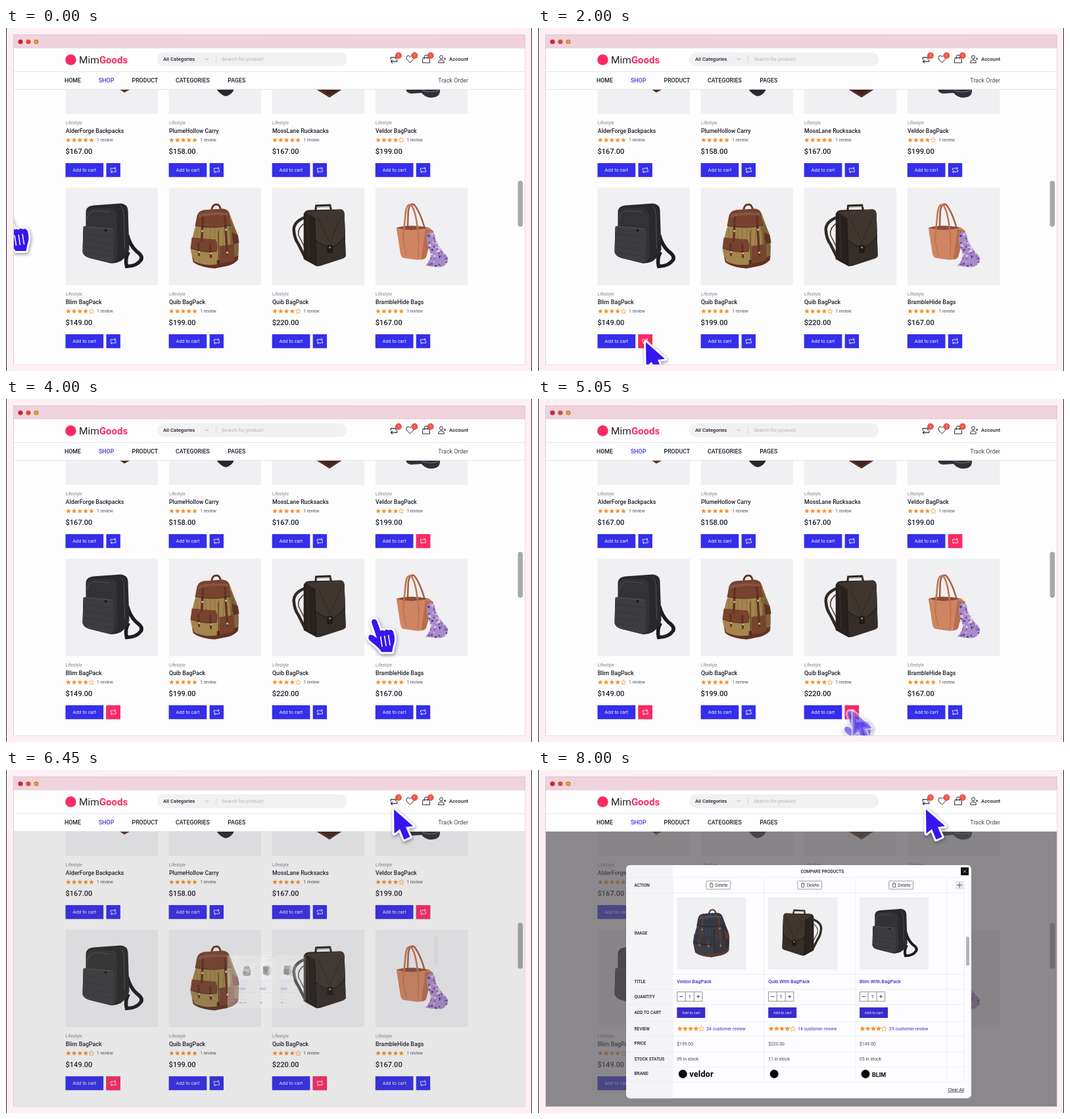
An HTML page with a canvas for the animation above (8.05 s loop, 800x523 px).

```html
<!DOCTYPE html>
<html lang="en">
<head>
<meta charset="utf-8">
<title>Product compare</title>
<style>
html, body { margin: 0; width: 100%; height: 100%; overflow: hidden; background: #fdf0f5; }
canvas { display: block; }
</style>
</head>
<body>
<canvas id="stage" width="800" height="523"></canvas>
<script>
const ctx = document.getElementById('stage').getContext('2d');
const LOOP = 8050;
const BLUE = '#352eea', RED = '#fb2a63', INK = '#1e1e2a', LINE = '#e6e6ec', STAR = '#f5922f';
const COLS = [90.5, 247.6, 404.7, 561.8];

// ---------- helpers ----------
const clamp = v => Math.max(0, Math.min(1, v));
const ramp = (t, start, len) => clamp((t - start) / len);
const ease = k => (1 - Math.cos(Math.PI * k)) / 2;

function rect(x, y, w, h, fill, r = 0) {
  ctx.fillStyle = fill;
  ctx.beginPath();
  ctx.roundRect(x, y, w, h, r);
  ctx.fill();
}
function box(x, y, w, h, color, r = 0) {
  ctx.strokeStyle = color;
  ctx.lineWidth = 0.8;
  ctx.beginPath();
  ctx.roundRect(x, y, w, h, r);
  ctx.stroke();
}
function dot(x, y, r, fill) {
  ctx.fillStyle = fill;
  ctx.beginPath();
  ctx.arc(x, y, r, 0, 7);
  ctx.fill();
}
function text(s, x, y, size, color = INK, weight = 400, align = 'left') {
  ctx.font = `${weight} ${size}px Roboto, sans-serif`;
  ctx.textAlign = align;
  ctx.fillStyle = color;
  ctx.fillText(s, x, y);
  return x + ctx.measureText(s).width;
}
function fill(d, color) {
  ctx.fillStyle = color;
  ctx.fill(new Path2D(d));
}
function line(d, color, width = 1) {
  ctx.strokeStyle = color;
  ctx.lineWidth = width;
  ctx.stroke(new Path2D(d));
}
function at(x, y, draw, sx = 1, sy = sx) {
  ctx.save();
  ctx.translate(x, y);
  ctx.scale(sx, sy);
  draw();
  ctx.restore();
}
function stars(x, y, n, gap = 8.8, r = 4.1) {
  for (let i = 0; i < 5; i++) {
    ctx.beginPath();
    for (let k = 0; k < 10; k++) {
      const a = k * Math.PI / 5 - Math.PI / 2, q = k % 2 ? r * 0.45 : r;
      ctx.lineTo(x + i * gap + q * Math.cos(a), y + q * Math.sin(a));
    }
    ctx.closePath();
    ctx.fillStyle = ctx.strokeStyle = STAR;
    ctx.lineWidth = 0.7;
    if (i < n) ctx.fill(); else ctx.stroke();
  }
}
const swapIcon = (x, y, color, s = 1) => at(x, y, () =>
  line('M-4 .5V-2.6H3.8M1.8-4.6L3.9-2.6L1.8-.6M4-.5V2.6H-3.8M-1.8 .6L-3.9 2.6L-1.8 4.6', color, 0.85), s);

// ---------- bags, each on a 140 x 148 tile ----------
function messenger() {
  line('M94 72Q98 88 108 97Q118 104 115 110Q108 120 93 120Q90 108 96 98', '#1d1d1f', 5.5);
  fill('M31 36Q32 28 42 27L84 24Q94 25 95 34L97 94Q95 104 84 112Q76 116 68 115L36 107Q27 104 26 98L27 62L31 58Z', '#29292b');
  fill('M32 37Q34 31 43 31L70 31Q78 33 78 42L79 104Q77 114 68 115L36 107Q30 104 31 96Z', '#333335');
  fill('M27 59L68 62Q74 63 74 69L73 110Q70 115 66 114L36 107Q27 104 26 98Z', '#3d3d3f');
  line('M33 48Q35 36 45 35L68 37M28 59L72 63M84 28Q89 34 89 44L90 92', '#56565a', 0.9);
  line('M28 70L72 75M28 80L72 86M28 90L72 96M28 99L71 105', '#343436', 0.8);
  dot(61, 65, 2, '#1a1a1b');
}
function backpack(body, flap, trim, metal) {
  line('M65 35Q66 25.5 72 25.5Q78 25 79 35', trim, 2.8);
  fill('M44 41Q46 35 54 34L82 32Q91 33 94 43Q99 58 104 70Q108 88 105 110Q100 116 90 119L70 123Q46 121 37 113L33 94Q36 72 41 58Z', body);
  for (let i = 0; i < 9; i++) line(`M${42 + i * 7} 62Q${45 + i * 6} 88 ${43 + i * 7} 114`, 'rgba(0,0,0,.13)', 1.2);
  fill('M95 48Q99 58 104 70Q108 88 105 110Q100 116 90 119Q96 84 91 60Z', 'rgba(30,18,8,.28)');
  fill('M36 106Q62 117 106 104L105 110Q100 116 90 119L70 123Q46 121 37 113Z', trim);
  fill('M43 42Q46 35 54 34L82 32Q91 33 92 40L95 57Q70 64 40 58Z', flap);
  fill('M46 41Q66 35 90 39L90 43Q68 39 45 46Z', 'rgba(255,255,255,.1)');
  fill('M35 88L73 91L73 117Q54 120 38 112Z', body);
  fill('M35 76L71 79Q76 86 73 97Q52 100 33 92Z', flap);
  fill('M77 89L99 86L100 110Q88 116 77 115Z', flap);
  fill('M96 68L105 72L107 84L98 86Z', trim);
  line('M52 44L50 82M85 42L88 88', trim, 3.4);
  line('M45 84L46 104M63 86L64 107M88 88L89 104', trim, 3);
  line('M40 58Q70 64 95 57M33 92Q52 100 73 97M75 66L76 116', 'rgba(20,8,5,.5)', 1.2);
  for (const [x, y] of [[51, 66], [87, 64], [46, 98], [64, 100], [89, 99]]) rect(x - 1.5, y - 1.5, 3, 3, metal, 1);
}
const tanPack = () => backpack('#a3854d', '#77432f', '#623224', '#d2b479');
const darkPack = () => backpack('#3c3e48', '#363843', '#5c3b30', '#b98a63');
function briefcase() {
  line('M50 45Q33 52 33 64Q34 78 40 86Q46 98 50 106', '#302925', 4.5);
  line('M50 54Q39 60 40 72L49 90', '#443b35', 1.5);
  line('M66 36L67 27.5L88 26.5L90 35', '#2a2420', 3);
  line('M67 30L89 29', '#8f8a83', 1.2);
  fill('M48 40Q50 34 57 34L104 33Q109 33 110 39L112 105L68 120L48 109Z', '#28221f');
  fill('M66 41L104 36Q109 36 110 41L112 104Q111 107 108 108L74 119Q68 121 67 116Z', '#352d28');
  fill('M50 37L104 33Q109 33 110 40L111 74Q100 88 89 92Q76 88 66 80L65 46Z', '#3f3630');
  line('M66 80Q76 88 89 92Q100 88 111 74M65 46L67 118', '#1a1614', 1);
  line('M70 46L88 84L106 42', '#2d2622', 1);
  rect(83.5, 87, 9, 13, '#221c19', 3);
  dot(88, 91, 1.6, '#8d8275');
  line('M54 42L56 108', '#3a312c', 1.2);
}
function tote() {
  line('M49 62L50 36Q52 22 59 26Q69 38 76 66', '#a95f43', 2.6);
  fill('M32 61Q52 68 82 61L88 66L77 106Q74 110 63 110L42 107Q39 105 38 100Z', '#cf8561');
  fill('M32 61Q52 55 82 61Q52 68 32 61Z', '#8b4c36');
  fill('M76 63L88 66L77 106Q74 110 70 109Z', '#b76e4e');
  line('M42 80L46 38Q48 23 55 27Q63 38 66 82', '#c27553', 2.6);
  line('M42 78L47 104M66 80L65 107', '#b66d4d', 1.1);
  ctx.save();
  ctx.clip(new Path2D('M80 68Q91 64 91 78Q97 92 104 99Q113 106 109 114Q104 122 95 121L76 119Q86 109 84 99Q75 82 80 68Z'));
  rect(70, 60, 50, 70, '#a98bc9');
  const tints = ['#6b4a9c', '#d9c4e8', '#8465bd', '#e8b9cf', '#54407f'];
  for (let i = 0; i < 120; i++) {
    const rnd = k => Math.abs(Math.sin(i * k) * 9301) % 1;
    dot(74 + 40 * rnd(12.9), 65 + 58 * rnd(78.2), 0.8 + 1.2 * rnd(4.7), tints[i % 5]);
  }
  ctx.restore();
}

// ---------- page ----------
const ITEMS = [
  ['AlderForge Backpacks', 167, 5], ['PlumeHollow Carry', 158, 5],
  ['MossLane Rucksacks', 167, 5], ['Veldor BagPack', 199, 4],
  ['Blim BagPack', 149, 4, messenger], ['Quib BagPack', 199, 5, tanPack],
  ['Quib BagPack', 220, 4, briefcase], ['BrambleHide Bags', 167, 5, tote]
];

function product([name, price, rate, bag], i, picked) {
  const x = COLS[i % 4], y = i < 4 ? 0 : 261;
  rect(x, y - 17.5, 140.5, 148.5, '#f0eff1');
  if (bag) at(x, y - 17.5, bag);
  text('Lifestyle', x + 0.3, y + 147, 6.7, '#85858c');
  text(name, x + 0.3, y + 159.5, 8.8, INK, 500);
  stars(x + 4.3, y + 171, rate);
  text('1 review', x + 47.6, y + 173.2, 6.7, '#55555c');
  text(`$${price}.00`, x, y + 192.2, 11.1, INK, 500);
  rect(x, y + 206, 57.7, 21.2, BLUE);
  text('Add to cart', x + 28.8, y + 219, 7.3, '#eeeeff', 400, 'center');
  rect(x + 62, y + 206, 21.4, 21.2, BLUE);
  if (picked > 0) {
    ctx.save();
    ctx.globalAlpha *= picked;
    rect(x + 62, y + 206, 21.4, 21.2, RED);
    ctx.restore();
  }
  swapIcon(x + 72.7, y + 216.6, '#fff');
}

function catalogue(picks) {
  rect(12, 31, 777, 482, '#fdfdfe');
  ITEMS.forEach((item, i) => product(item, i, picks[i] || 0));
  fill('M172 93L180 98.5L188 94V93Z', '#5b3426');
  fill('M320 93Q326 102 334 104Q344 102 347 93Z', '#29282c');
  fill('M471 93L492 106L512 93Z', '#43241f');
  line('M474 93L492 104L510 93', '#7a3f30', 1);
  fill('M608 93Q609 99 616 100L632 99Q640 109 654 105Q661 102 660 93Z', '#303137');
  line('M633 95Q646 100 658 95', '#6d6e74', 1.2);
  rect(778.5, 233, 7.5, 70, '#a8a8aa', 3.7);
}

function header() {
  rect(12, 31, 777, 62.5, '#fefefe');
  rect(12, 66, 777, 1, LINE);
  rect(12, 93, 777, 1, LINE);
  dot(98.5, 48.5, 8.3, RED);
  text('Goods', text('Mim', 111, 54, 15.5, '#25252f'), 54, 15, RED, 700);
  rect(230, 37, 288.5, 21, '#f1f1f3', 10.5);
  text('All Categories', 239, 50.3, 7.7, INK, 500);
  line('M302.5 46L305.3 48.8L308 46', '#a0a0a6', 0.8);
  rect(319, 42, 0.8, 11, '#d2d2d6');
  text('Search for product', 328, 50.3, 7.7, '#b4b4b8');

  swapIcon(590, 48, '#24242d', 1.2);
  line('M614.5 53L609.9 48.2Q607.7 45 610 42.8Q612.8 41 614.5 43.8Q616.3 41 619 42.8Q621.2 45 619.1 48.2Z', '#24242d');
  line('M634 45.5H644L644.6 53H633.4ZM636.4 47V43.8Q636.5 41 639 41Q641.5 41 641.6 43.8V47', '#24242d');
  line('M657.5 53Q657.5 48.6 662 48.6Q666.3 48.6 666.3 53ZM666 47H669.2M667.6 45.4V48.6', '#24242d');
  ctx.beginPath();
  ctx.arc(662, 44.4, 2.5, 0, 7);
  ctx.stroke();
  for (const x of [597, 621.4, 645.8]) {
    dot(x, 42, 4.9, '#f05248');
    text('1', x, 44, 5.4, '#ffe2de', 400, 'center');
  }
  text('Account', 674, 50.3, 7.8, INK, 500);

  [['HOME', 89], ['SHOP', 141], ['PRODUCT', 191.5], ['CATEGORIES', 258], ['PAGES', 337.3]]
    .forEach(([s, x]) => text(s, x, 83, 8.8, s === 'SHOP' ? '#4435e6' : INK, 500));
  text('Track Order', 703, 83, 8.9, '#484850', 400, 'right');
}

function frame() {
  rect(0, 0, 800, 523, '#fdf0f5');
  rect(0, 0, 1, 523, '#2b2629');
  rect(799, 0, 1, 523, '#2b2629');
  rect(11.5, 10, 778, 21, '#efd2dc');
  dot(22, 21, 3.6, '#c9243a');
  dot(34, 21, 3.6, '#d2502c');
  dot(46, 21, 3.6, '#cf852b');
  dot(46, 21, 1.6, '#e8b46a');
  box(11.5, 10.4, 777.6, 502.6, '#d5c2ca');
}

// ---------- compare window ----------
const PICKS = [
  { title: 'Veldor BagPack', bag: darkPack, reviews: 24, price: 199, stock: '09', brand: 'veldor', size: 13 },
  { title: 'Quib With BagPack', bag: briefcase, flip: true, reviews: 14, price: 220, stock: '11' },
  { title: 'Blim With BagPack', bag: messenger, reviews: 29, price: 149, stock: '05', brand: 'BLIM', size: 9 }
];

function pickColumn(p, i) {
  const x = 211.3 + i * 138.9, mid = x + 63;
  box(mid - 18.4, 169.2, 36.8, 12.6, '#85858a', 1.5);
  line(`M${mid - 13} 173.2H${mid - 8}M${mid - 12.4} 173.2V178.8H${mid - 8.6}V173.2M${mid - 11.5} 172H${mid - 9.5}`, '#33333a', 0.7);
  text('Delete', mid - 4.5, 178, 6.7, '#33333a');
  rect(x, 194, 105.2, 110.5, '#f0eff1');
  at(p.flip ? x + 105.2 : x, 194, p.bag, p.flip ? -0.749 : 0.749, 0.744);
  text(p.title, x, 325.3, 7.4, '#3f2cc9', 500);
  box(x + 0.4, 338.2, 38.2, 14.4, '#77777c');
  line(`M${x + 13} 338V352.6M${x + 26} 338V352.6`, '#77777c', 0.8);
  line(`M${x + 4} 345.4H${x + 9}M${x + 30} 345.4H${x + 35}M${x + 32.5} 343V347.8`, '#33333a', 0.9);
  text('1', x + 19.5, 348, 7, INK, 400, 'center');
  rect(x, 362, 43, 16, '#3a2bd0');
  text('Add to cart', x + 21.5, 372, 5.6, '#f0eeff', 400, 'center');
  stars(x + 4.4, 394.6, 4, 8.2, 4.3);
  text(`${p.reviews} customer review`, x + 45, 396.8, 6.8, '#3f2cc9');
  text(`$${p.price}.00`, x, 419.5, 6.8, '#4a4a50');
  text(`${p.stock} in stock`, x, 443, 6.8, '#4a4a50');
  dot(x + 9, 463.5, 6.5, '#08080a');
  if (p.brand) text(p.brand, x + 19, 467.5, p.size, '#08080a', 700);
}

function compareWindow() {
  rect(134, 145, 525, 355.5, '#fdfcfe', 6);
  rect(134, 145, 70.5, 355.5, '#f4f3f6', [6, 0, 0, 6]);
  for (const y of [163.5, 187, 311, 334, 357, 383, 405.5, 429, 452.5, 475.5]) rect(134, y, 514, 0.8, '#ebeaee');
  for (const x of [204.5, 343.5, 482.5, 621.5, 648]) rect(x, 163.5, 0.8, 312, '#ebeaee');
  text('COMPARE PRODUCTS', 432.3, 156.8, 6.6, INK, 500, 'center');
  rect(643, 148.5, 12, 12, '#09090b');
  line('M646.8 152.3L651.2 156.7M651.2 152.3L646.8 156.7', '#e8e8e8', 0.8);
  rect(634.5, 169, 13, 13, '#e9e8ec');
  line('M637 175.5H645M641 171.5V179.5', '#55555a', 0.9);
  const labels = { ACTION: 177.6, IMAGE: 251.2, TITLE: 325.2, QUANTITY: 347.8, 'ADD TO CART': 372.3,
    REVIEW: 396.6, PRICE: 419.4, 'STOCK STATUS': 443, BRAND: 465 };
  for (const s in labels) text(s, 146.5, labels[s], 6.5, INK, 500);
  PICKS.forEach(pickColumn);
  text('Clear All', 648, 489.6, 6.6, INK, 400, 'right');
  rect(623, 490.8, 25, 0.7, INK);
}

function dialog(p) {
  if (p <= 0) return;
  const fade = p ** 1.15;
  rect(12, 94, 777, 419, `rgba(84,81,84,${0.68 * fade})`);
  ctx.save();
  ctx.globalAlpha = fade;
  ctx.save();
  ctx.translate(396.5, 322.8);
  ctx.scale(p, p);
  ctx.translate(-396.5, -322.8);
  compareWindow();
  ctx.restore();
  rect(651, 254, 5, 44.5, '#b5b4b8', 2.5);
  ctx.restore();
}

// ---------- cursor ----------
const ARROW = new Path2D('M0 0L.6 37L9 30L15.5 46L24.5 42L18 27L29 25.5Z');
const HAND = new Path2D('M-4 1Q-4-4 0-4Q3-4 4.5 0L9.5 14Q12 11 15.5 14Q18 10 22 13Q26 10 29 15Q33 26 29 36L27 46H11Q8 40-4 31Q-11 26-8 21Q-5 17 4 25Z');

function outlined(shape, alpha) {
  if (alpha <= 0) return;
  ctx.save();
  ctx.globalAlpha = alpha;
  ctx.lineJoin = 'round';
  ctx.strokeStyle = '#fff';
  ctx.lineWidth = 6;
  ctx.shadowColor = 'rgba(30,20,60,.45)';
  ctx.shadowBlur = 5;
  ctx.shadowOffsetX = 1;
  ctx.shadowOffsetY = 2;
  ctx.stroke(shape);
  ctx.shadowColor = 'transparent';
  ctx.fillStyle = '#3715ee';
  ctx.fill(shape);
  if (shape === HAND) line('M9.5 22L12 38M15.5 21L18 37M21.5 20L24 36', '#fff', 1.6);
  ctx.restore();
}

const STOPS = [[7.5, 290], [164, 479], [635, 218], [478, 479], [590, 60]];
const MOVES = [[0, 1250], [2100, 3000], [3560, 4500], [5000, 5920]];

function cursor(t) {
  let [x, y] = STOPS[0], arrow = 0;
  MOVES.forEach(([a, b], i) => {
    const k = ease(ramp(t, a, b - a)), [nx, ny] = STOPS[i + 1];
    x += (nx - STOPS[i][0]) * k;
    y += (ny - STOPS[i][1]) * k;
    arrow += ramp(t, b, 150);
    if (MOVES[i + 1]) arrow -= ramp(t, MOVES[i + 1][0], 100);
  });
  at(x - 4, y + 4, () => outlined(HAND, 1 - arrow));
  at(x, y, () => outlined(ARROW, arrow));
}

function draw(t) {
  const picked = i => ramp(t, MOVES[i][1], 150);
  frame();
  ctx.save();
  ctx.beginPath();
  ctx.rect(12, 31, 777, 482);
  ctx.clip();
  catalogue({ 4: picked(0), 3: picked(1), 6: picked(2) });
  header();
  dialog(ease(ramp(t, 6345, 335)));
  cursor(t);
  ctx.restore();
}

const begin = performance.now();
function tick() {
  draw((performance.now() - begin) % LOOP);
  requestAnimationFrame(tick);
}
tick();
</script>
</body>
</html>
```
